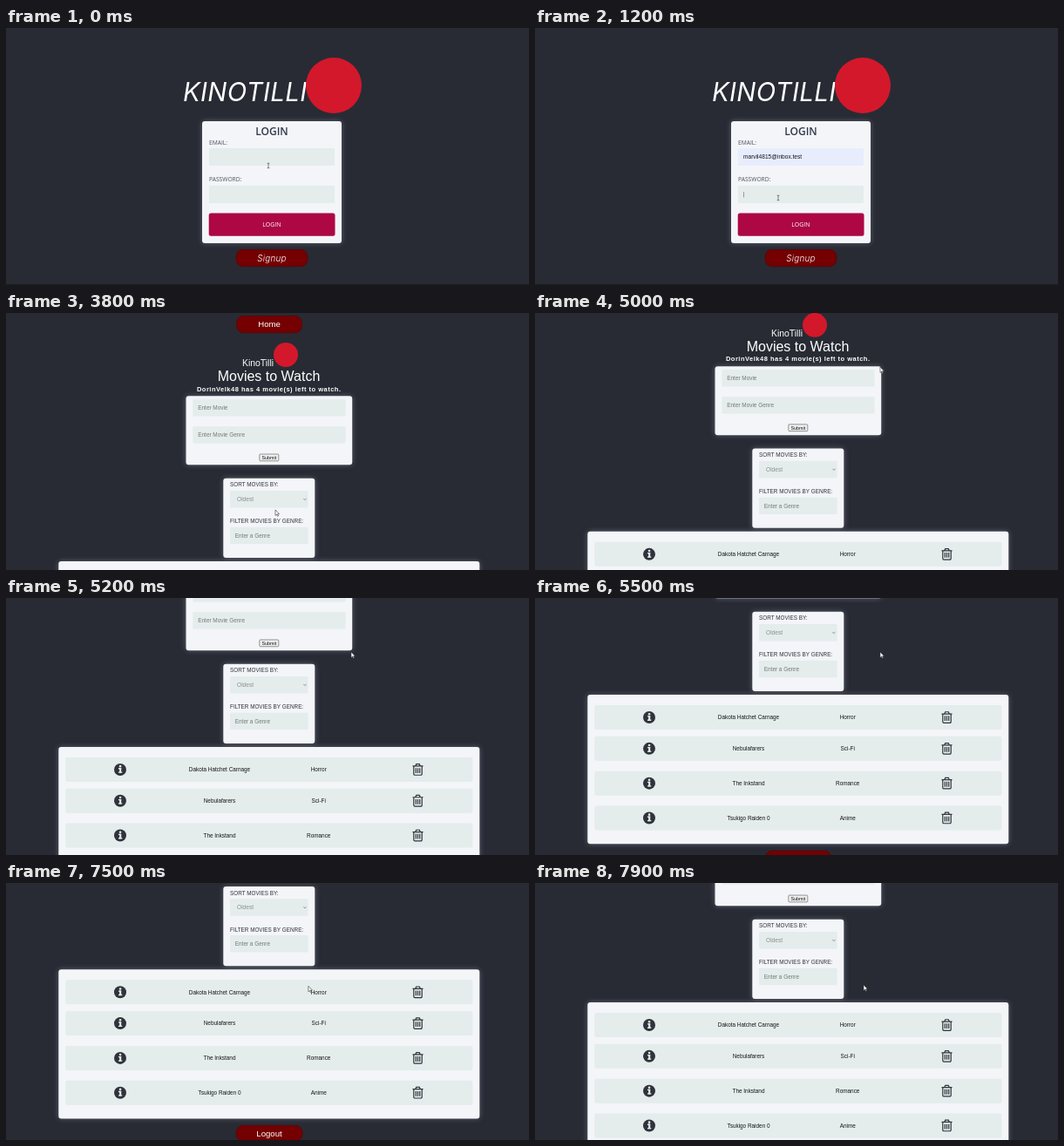
An HTML page with a canvas for the animation above (8000 ms loop, 600 by 295 pixels).

```html
<!DOCTYPE html>
<html lang="en">
<head>
<meta charset="utf-8">
<title>Movie list</title>
<style>
  html, body { margin: 0; height: 100%; overflow: hidden; background: #282b34; }
  canvas { display: block; }
</style>
</head>
<body>
<canvas id="stage" width="600" height="295"></canvas>
<script>
const ctx = document.getElementById('stage').getContext('2d');
const LOOP = 8000, HOME_AT = 3800, PAGE_END = 185.7;
const ARIAL = '"Liberation Sans", Arial, sans-serif';
const ROUND = '"Open Sans", sans-serif';
const WIDE = 'Inter, sans-serif';
const PAPER = '#f3f5f9', FIELD = '#e4ecec', INK = '#30333b', LOGO = '#d3182b';
const centered = { align: 'center' };

const movies = [
  ['Dakota Hatchet Carnage', 'Horror'],
  ['Nebulafarers', 'Sci-Fi'],
  ['The Inkstand', 'Romance'],
  ['Tsukigo Raiden 0', 'Anime'],
];
// Pointer stops: time, x, y
const loginStops = [[100, 301, 158], [300, 298, 149], [800, 279, 195], [2300, 279, 195], [3000, 309, 226]];
const homeStops = [
  [3800, 309, 226], [4600, 396, 62], [5850, 396, 62], [6000, 466, 112], [6250, 468, 225],
  [6500, 161, 244], [6700, 140, 240], [7150, 134, 128], [7600, 377, 117],
];

const progress = (t, from, to) => Math.min(1, Math.max(0, (t - from) / (to - from)));

function pointerAt(stops, t) {
  let [, x, y] = stops[0];
  for (let i = 1; i < stops.length; i++) {
    const p = progress(t, stops[i - 1][0], stops[i][0]);
    const eased = p * p * (3 - 2 * p);
    x += (stops[i][1] - stops[i - 1][1]) * eased;
    y += (stops[i][2] - stops[i - 1][2]) * eased;
  }
  return [x, y];
}

function scrollAt(t) {
  const down = 1 - (1 - progress(t, 4936, 5800)) ** 2.6;
  const up = Math.max(0, (t - 7600) / 300) ** 2;
  return PAGE_END * down - 37.5 * up;
}

function box(x, y, w, h, r, fill, stroke) {
  ctx.beginPath();
  ctx.roundRect(x, y, w, h, r);
  ctx.fillStyle = fill;
  ctx.fill();
  if (stroke) line(undefined, stroke, 0.7);
}

function line(path, color, width) {
  ctx.strokeStyle = color;
  ctx.lineWidth = width;
  path ? ctx.stroke(new Path2D(path)) : ctx.stroke();
}

function at(x, y, scale, paint) {
  ctx.save();
  ctx.translate(x, y);
  ctx.scale(scale, scale);
  paint();
  ctx.restore();
}

function card(x, y, w, h) {
  ctx.save();
  ctx.shadowColor = 'rgba(190,198,215,.35)';
  ctx.shadowBlur = 6;
  box(x, y, w, h, 3, PAPER);
  ctx.restore();
}

function text(str, x, y, size, color, { font = ARIAL, style = '', align = 'left', spacing = 0 } = {}) {
  ctx.font = `${style} ${size}px ${font}`;
  ctx.letterSpacing = spacing + 'px';
  ctx.textAlign = align;
  ctx.fillStyle = color;
  ctx.fillText(str, x, y);
}

function disc(x, y, r, color) {
  ctx.beginPath();
  ctx.arc(x, y, r, 0, Math.PI * 2);
  ctx.fillStyle = color;
  ctx.fill();
}

function field(x, y, w, hint) {
  box(x, y, w, 19.3, 1, FIELD);
  text(hint, x + 5.8, y + 12, 6.4, '#757879');
}

function pill(x, y, w, h, label, baseline, size, options) {
  box(x, y, w, h, 8, '#740002', '#4f080b');
  text(label, x + w / 2, baseline, size, '#fff', { ...centered, ...options });
}

function infoIcon(x, y, hovered) {
  at(x, y, hovered ? 1.28 : 1, () => {
    disc(0, 0, 7, hovered ? '#666a71' : INK);
    disc(0.1, -3.8, 1.3, FIELD);
    line('M-2-1.2H1.2M-2 3.2H2.3', FIELD, 1.3);
    line('M.2-1.8V3.8', FIELD, 2.1);
  });
}

function trashIcon(x, y) {
  at(x, y, 1, () => line('M-6-4H6M-2.8-4L-1.8-6.3H1.8L2.8-4M-4.7-4V5Q-4.7 6.3-3.4 6.3H3.4Q4.7 6.3 4.7 5V-4M-2.2-1.8V4M0-1.8V4M2.2-1.8V4', INK, 1.2));
}

const pointers = {
  beam: 'M-1.3-2.7H1.3M0-2.7V2.7M-1.3 2.7H1.3',
  arrow: 'M0 0V6.4L1.5 5.1 2.5 7.3 3.5 6.8 2.5 4.7H4.5Z',
  hand: 'M-.6.5Q0-.3.6.5V3L3.4 3.6Q4 4 3.8 5L3.2 7.4H-.4L-2.4 4.6Q-2.2 3.6-.6 4.6Z',
};
function pointer(kind, x, y) {
  at(x, y, 1, () => {
    ctx.fillStyle = '#fff';
    if (kind !== 'beam') ctx.fill(new Path2D(pointers[kind]));
    line(pointers[kind], '#333', 0.6);
  });
}

function drawLogin(t) {
  const filled = t >= 300;
  const round = { font: ROUND };
  text('KINOTILLI', 203, 84, 29.3, '#fff', { font: WIDE, style: 'italic', spacing: 0.4 });
  disc(376, 66, 32, LOGO);

  card(225, 107, 160, 140);
  text('LOGIN', 305, 123, 12, '#34394a', { ...round, ...centered, style: '600' });
  text('EMAIL:', 233, 133.5, 6.7, '#50545e', round);
  box(233, 138, 144, 20, 1, filled ? '#e7edfc' : FIELD);
  if (filled) text('marvil4815@inbox.test', 239, 150.4, 6.6, '#15171b');
  text('PASSWORD:', 233, 176.3, 6.7, '#50545e', round);
  box(233, 181, 144, 20, 1, FIELD);

  const typed = Math.min(7, Math.max(0, Math.floor((t - 1280) / 110)));
  for (let i = 0; i < typed; i++) disc(240.2 + i * 2.15, 190.7, 0.7, '#666b72');
  if (t >= 1200) box(239.3 + typed * 2.15, 188, 0.6, 6.5, 0, '#666');

  box(232.7, 212.4, 144.8, 26.3, 2.5, '#ad0843');
  text('LOGIN', 305, 228.1, 7, '#fff', { ...round, ...centered });
  pill(264, 254.3, 82, 19.5, 'Signup', 267.8, 9.8, { font: WIDE, style: 'italic 300', spacing: 0.3 });
  box(0, 294, 600, 1, 0, '#1a1c20');

  const [x, y] = pointerAt(loginStops, t);
  pointer(y < 201 ? 'beam' : y < 212 ? 'arrow' : 'hand', x, y);
}

function drawHome(t) {
  const scroll = scrollAt(t);
  const [x, y] = pointerAt(homeStops, t);
  ctx.save();
  ctx.translate(0, -scroll);

  pill(264.5, 3.3, 75, 19.5, 'Home', 16.4, 9.6);
  text('KinoTilli', 307, 61, 10.4, '#fff', { align: 'right' });
  disc(321, 48, 14, LOGO);
  text('Movies to Watch', 301.5, 78.4, 16, '#fff', centered);
  text('DorinVelk48 has 4 movie(s) left to watch.', 301.7, 89.5, 7.5, '#fff',
    { ...centered, style: 'bold', spacing: 0.5 });

  card(206.5, 95.3, 190.7, 79);
  field(214.5, 99.3, 175, 'Enter Movie');
  field(214.5, 130.3, 175, 'Enter Movie Genre');
  box(290.8, 162, 22, 7.8, 1, '#efefef', '#6b6b6b');
  text('Submit', 301.8, 168, 5.4, '#111', centered);

  card(249.3, 189.7, 105, 91.3);
  text('SORT MOVIES BY:', 257, 199.2, 6.35, INK);
  box(257, 204, 89.5, 19.5, 1, FIELD);
  text('Oldest', 265, 216, 6.6, '#8b9091');
  line('M341.3 213L342.9 214.6L344.5 213', '#777', 0.8);
  text('FILTER MOVIES BY GENRE:', 257, 241.2, 6.35, INK);
  field(257, 245.8, 89.5, 'Enter a Genre');

  card(60.3, 285, 483, 171.3);
  let overIcon = false;
  movies.forEach(([title, genre], row) => {
    const mid = Math.max(311, 307 + 39.8 * row);
    const inRow = Math.abs(y + scroll - mid) < 14;
    const onInfo = inRow && Math.abs(x - 131) < 34;
    overIcon ||= onInfo || (inRow && Math.abs(x - 472.5) < 7);
    box(68.3, mid - 14, 467, 28, 2, FIELD);
    infoIcon(131, mid, onInfo);
    text(title, 245, mid + 2.2, 6.4, '#15171b', centered);
    text(genre, 358.7, mid + 2.2, 6.4, '#15171b', centered);
    trashIcon(472.5, mid);
  });
  pill(264, 464, 76, 18, 'Logout', 476.3, 9.6);
  ctx.restore();
  pointer(overIcon ? 'hand' : 'arrow', x, y);
}

function draw() {
  const t = performance.now() % LOOP;
  box(0, 0, 600, 295, 0, '#282b34');
  (t < HOME_AT ? drawLogin : drawHome)(t);
  requestAnimationFrame(draw);
}
draw();
</script>
</body>
</html>
```
